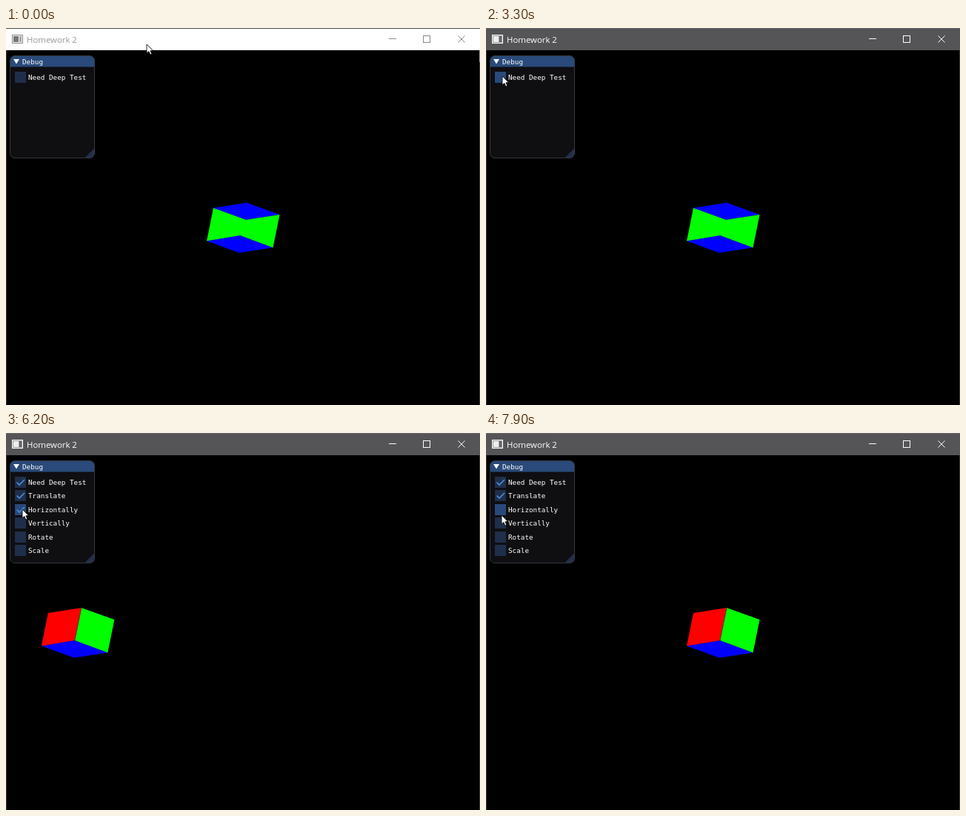
An HTML page with a canvas for the animation above (8 s loop, 640 by 509 pixels).

```html
<!DOCTYPE html>
<html lang="en">
<head>
<meta charset="utf-8">
<title>Cube demo</title>
<style>
  html, body { margin: 0; width: 100%; height: 100%; overflow: hidden; background: #000; }
  canvas { display: block; width: 640px; height: 509px; }
</style>
</head>
<body>
<canvas id="stage" width="640" height="509"></canvas>
<script>
const ctx = document.getElementById('stage').getContext('2d');
const LOOP = 8000, TICK = 100, FOCUS = 600;
const LABELS = ['Need Deep Test', 'Translate', 'Horizontally', 'Vertically', 'Rotate', 'Scale'];
const ROW_TOP = 59, ROW_STEP = 18.4;
const DEPTH = 0, SLIDE = 2;
const SLIDE_STEP = 15.94;

// press time, release time, row
const CLICKS = [
  [1350, 1500, 0], [2750, 2900, 0], [3350, 3500, 0],
  [4350, 4500, 1], [5250, 5345, 2], [7350, 7500, 2]
];

// time, x, y of the pointer tip
const PATH = [
  [0, 190, 22], [700, 190, 22], [1300, 22, 65], [3850, 22, 65],
  [4150, 22, 84], [4800, 22, 84], [5100, 22, 103],
  [7700, 22, 103], [7900, 21, 111], [8000, 21, 113]
];

const isOn = (row, t) => CLICKS.filter(c => c[2] === row && t >= c[1]).length % 2 === 1;
const isPressed = (row, t) => CLICKS.some(c => c[2] === row && t >= c[0] && t < c[1]);

function pointerAt(t) {
  const i = Math.max(1, PATH.findIndex(p => p[0] > t));
  const [t0, x0, y0] = PATH[i - 1], [t1, x1, y1] = PATH[i];
  const k = (t - t0) / (t1 - t0), e = k * k * (3 - 2 * k);
  return [x0 + (x1 - x0) * e, y0 + (y1 - y0) * e];
}

function rect(color, x, y, w, h) {
  ctx.fillStyle = color;
  ctx.fillRect(x, y, w, h);
}

function tracePath(pts) {
  ctx.beginPath();
  for (const [x, y] of pts) ctx.lineTo(x, y);
}

function poly(color, pts) {
  tracePath(pts);
  ctx.closePath();
  ctx.fillStyle = color;
  ctx.fill();
}

function stroke(color, width, pts) {
  tracePath(pts);
  ctx.strokeStyle = color;
  ctx.lineWidth = width;
  ctx.stroke();
}

function text(str, x, y, font, color) {
  ctx.font = font;
  ctx.fillStyle = color;
  ctx.fillText(str, x, y);
}

// Bounces between -0.8 and 0.8 of the half width in steps of 0.05.
function slideOffset(t) {
  if (!isOn(SLIDE, t)) return 0;
  const n = Math.floor((t - 5345) * 0.0593);
  const m = (n + 16) % 64;
  return SLIDE_STEP * ((m < 32 ? m : 64 - m) - 16);
}

function drawCube(t) {
  const a = [280, 243], b = [325, 236], c = [369.5, 252], d = [324, 259];
  const e = [271, 287.5], f = [316, 280], g = [360.5, 296.5], h = [315, 303.5];
  ctx.save();
  ctx.translate(slideOffset(t), 0);
  poly('#00f', [e, f, g, h]);
  if (isOn(DEPTH, t)) {
    poly('#f00', [a, b, f, e]);
    poly('#0f0', [b, c, g, f]);
    stroke('#430', 0.8, [b, f]);
  } else {
    poly('#00f', [a, b, c, d]);
    poly('#0f0', [a, d, c, g, f, e]);
  }
  ctx.restore();
}

function drawFrame(t) {
  const active = t >= FOCUS;
  const ink = active ? '#fff' : '#999';
  rect(active ? '#555557' : '#fff', 0, 0, 640, 30);
  rect(active ? '#68686a' : '#4a4a4a', 0, 0, 640, 1);
  rect('#333', 0, 30, 1, 479);
  rect('#333', 639, 30, 1, 479);
  if (!active) rect('#999', 639, 30, 1, 16);

  rect(active ? '#fff' : '#8c8c8c', 8, 9, 15, 12);
  rect(active ? '#999' : '#f4f4f4', 9, 10, 13, 10);
  rect(active ? '#eee' : '#777', 10, 11, 7, 8);
  rect(active ? '#666' : '#aaa', 18, 11, 3, 8);

  text('Homework 2', 28, 20, '11.4px "Open Sans", "Noto Sans", sans-serif', ink);
  const line = active ? '#fff' : '#888';
  rect(line, 517, 14, 10, 1);
  ctx.strokeStyle = line;
  ctx.lineWidth = 1;
  ctx.strokeRect(563.5, 10.5, 9, 9);
  stroke(line, 1, [[610.5, 10.5], [619.5, 19.5]]);
  stroke(line, 1, [[619.5, 10.5], [610.5, 19.5]]);
}

function drawPanel(t, [px, py]) {
  const mono = '9.3px "DejaVu Sans Mono", "Liberation Mono", monospace';
  const box = new Path2D();
  box.roundRect(5.5, 37.5, 114, 138, 6.5);
  ctx.save();
  ctx.clip(box);
  rect('#0f0e11', 5, 37, 116, 140);
  rect('#294a7a', 5, 37, 116, 15.5);
  poly('#232f48', [[106, 175.5], [120, 161.5], [120, 175.5]]);
  ctx.restore();
  ctx.strokeStyle = '#36363f';
  ctx.lineWidth = 1;
  ctx.stroke(box);

  poly('#fff', [[10, 42], [18, 42], [14, 48.5]]);
  text('Debug', 22, 49, mono, '#fff');

  const inside = px >= 12 && px < 110 && py > 58;
  const hovered = inside ? Math.floor((py - 58) / ROW_STEP) : -1;
  LABELS.slice(0, isOn(DEPTH, t) ? 6 : 1).forEach((label, row) => {
    const y = Math.round(ROW_TOP + row * ROW_STEP);
    const fill = isPressed(row, t) ? '#3769a8' : row === hovered ? '#29497a' : '#1f2f4a';
    rect(fill, 12, y, 15, 15);
    if (isOn(row, t)) stroke('#4a8cdc', 1.7, [[14.5, y + 7.5], [18, y + 11], [25, y + 4]]);
    text(label, 30, y + 11, mono, '#fff');
  });
}

function drawPointer([x, y]) {
  const shape = [[0, 0], [0, 12], [2.8, 9.5], [4.8, 14], [6.8, 13.1], [4.9, 8.8], [8.6, 8.6]]
    .map(([dx, dy]) => [x + dx, y + dy]);
  poly('#fff', shape);
  stroke('#111', 0.9, [...shape, shape[0]]);
}

function draw(now) {
  const t = Math.floor(now % LOOP / TICK) * TICK;
  const pointer = pointerAt(t);
  rect('#000', 0, 0, 640, 509);
  drawCube(t);
  drawFrame(t);
  drawPanel(t, pointer);
  drawPointer(pointer);
}

const start = performance.now();
function loop() {
  draw(performance.now() - start);
  requestAnimationFrame(loop);
}
loop();
</script>
</body>
</html>
```
